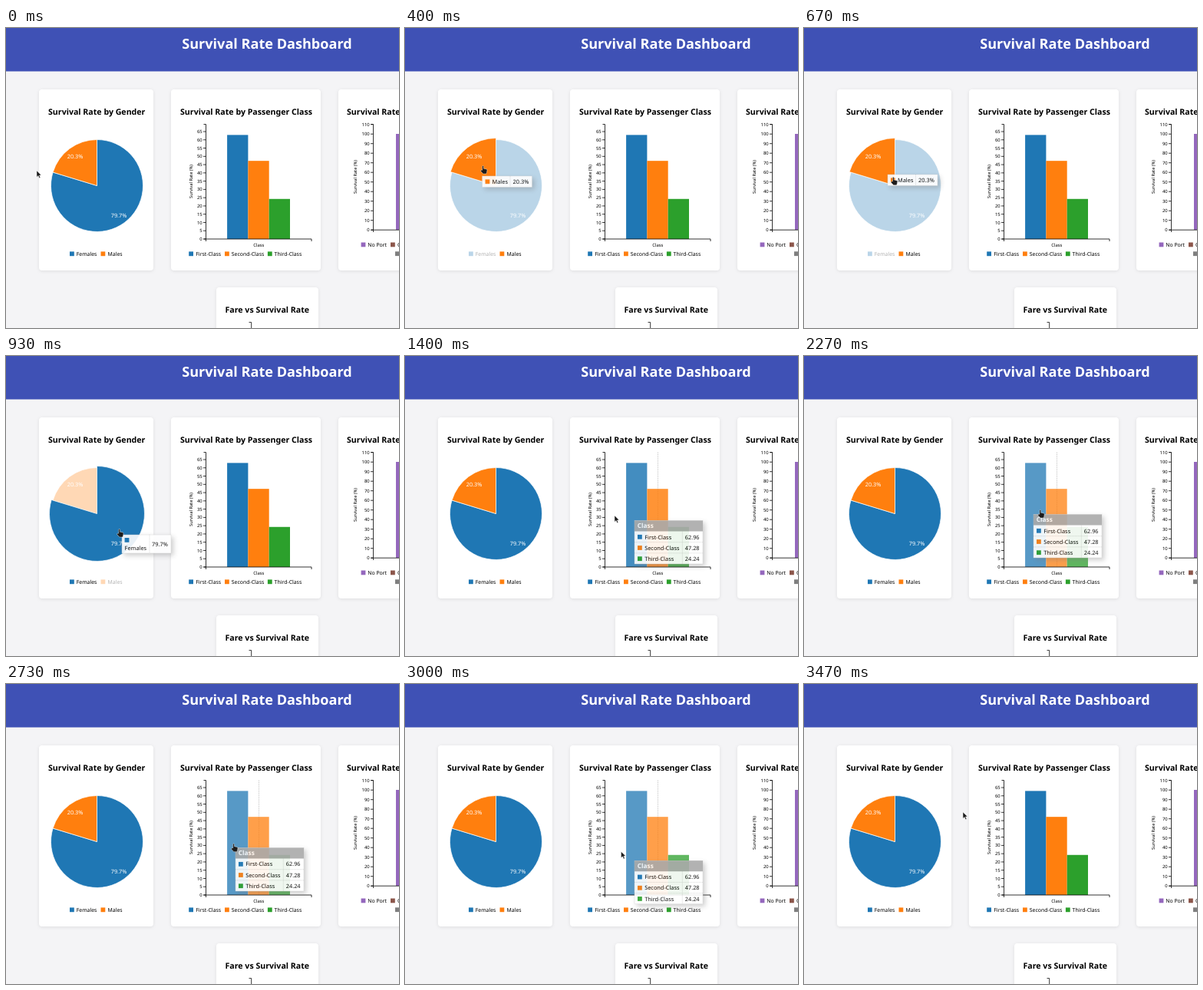
Animation, 512 px wide and 391 px high, one loop 3540 ms. Source, as an HTML page:

```html
<!DOCTYPE html>
<html lang="en">
<head>
<meta charset="utf-8">
<title>Survival Rate Dashboard</title>
<style>
  html, body { margin: 0; width: 100%; height: 100%; overflow: hidden; background: #f4f4f6; }
  svg { display: block; width: 512px; height: 391px; font-family: "Noto Sans", "Open Sans", sans-serif; text-rendering: geometricPrecision; }
  .card { filter: drop-shadow(0 1px 2px rgba(0, 0, 0, .09)); }
  .tip { filter: drop-shadow(3px 3px 3px rgba(119, 119, 119, .4)); }
</style>
</head>
<body>
<svg id="stage" viewBox="0 0 512 391"></svg>
<script>
const LOOP = 3540, STEP = 200 / 3;
const BLUE = '#1f77b4', ORANGE = '#ff7f0e', GREEN = '#2ca02c';
const PURPLE = '#9467bd', BROWN = '#8c564b', GRAY = '#7f7f7f';
const INK = '#000';
const stage = document.getElementById('stage');

function add(parent, tag, attrs = {}) {
  const el = document.createElementNS('http://www.w3.org/2000/svg', tag);
  for (const key in attrs) el.setAttribute(key, attrs[key]);
  parent.appendChild(el);
  return el;
}
const group = (parent, attrs) => add(parent, 'g', attrs);
const rect = (parent, x, y, width, height, fill, more) =>
  add(parent, 'rect', { x, y, width, height, fill, ...more });
const line = (parent, d, stroke = INK, width = 0.8, more) =>
  add(parent, 'path', { d, stroke, 'stroke-width': width, fill: 'none', ...more });
function text(parent, x, y, size, str, more) {
  const el = add(parent, 'text', { x, y, 'font-size': size, fill: INK, ...more });
  el.textContent = str;
  return el;
}
const bold = { 'font-weight': 700 };
const middle = { 'text-anchor': 'middle' };
const show = (el, on) => el.setAttribute('visibility', on ? 'visible' : 'hidden');
const move = (el, x, y) => el.setAttribute('transform', `translate(${x} ${y})`);

function card(x, y, w, h, title, titleX) {
  rect(stage, x, y, w, h, '#fff', { rx: 4, class: 'card' });
  text(stage, titleX, y + 33.2, 10.62, title, bold);
}

function legend(x, y, color, label, textX) {
  const g = group(stage);
  rect(g, x, y, 5.8, 5.8, color);
  text(g, textX, y + 5.4, 6.9, label);
  return g;
}

function yAxis(x, top, bottom, count, step, gap) {
  line(stage, `M${x - 3} ${top}H${x}V${bottom}H${x - 3}`);
  for (let i = 0; i <= count; i++) {
    const y = bottom - i * gap;
    line(stage, `M${x - 3.5} ${y}H${x}`);
    text(stage, x - 4.8, y + 2.1, 5.9, i * step, { 'text-anchor': 'end' });
  }
}

function axisLabel(x, y) {
  text(stage, 0, 0, 5.7, 'Survival Rate (%)', { ...middle, transform: `translate(${x} ${y}) rotate(-90)` });
}

// Header and cards
rect(stage, 0, 0, 512, 391, '#f4f4f6');
rect(stage, 0, 0, 512, 56.5, '#3f51b5');
text(stage, 340, 27, 18.1, 'Survival Rate Dashboard', { ...bold, ...middle, fill: '#fff' });
card(43, 80, 149, 236, 'Survival Rate by Gender', 55);
card(215, 80, 195, 236, 'Survival Rate by Passenger Class', 227);
card(433, 80, 170, 236, 'Survival Rate by Port', 444);
card(274, 338, 133, 200, 'Fare vs Survival Rate', 285.5);

// Pie
const PIE = { x: 118.5, y: 205.5, r: 60 };
const SHARE = 0.797;

function wedge(from, to, r) {
  const at = f => `${PIE.x + r * Math.sin(f * 2 * Math.PI)} ${PIE.y - r * Math.cos(f * 2 * Math.PI)}`;
  return `M${PIE.x} ${PIE.y}L${at(from)}A${r} ${r} 0 ${to - from > 0.5 ? 1 : 0} 1 ${at(to)}Z`;
}

const slices = [
  { name: 'Females', from: 0, to: SHARE, fill: BLUE, label: '79.7%', lx: 147, ly: 247, qx: 83, tx: 91.7 },
  { name: 'Males', from: SHARE, to: 1, fill: ORANGE, label: '20.3%', lx: 90, ly: 169.6, qx: 123.5, tx: 132.5 }
];
for (const s of slices) {
  s.shape = add(stage, 'path', { fill: s.fill, stroke: '#fff', 'stroke-width': 0.7 });
  text(stage, s.lx, s.ly, 7.3, s.label, { ...middle, fill: '#fff' });
  s.key = legend(s.qx, 291.4, s.fill, s.name, s.tx);
}

// Class bars
const focus = line(stage, 'M329.5 125.5V275', '#aaa', 0.7, { 'stroke-dasharray': '1.2 1.2' });
const classes = [
  ['First-Class', 62.96, BLUE, 238.2, 247.3],
  ['Second-Class', 47.28, ORANGE, 285, 293.8],
  ['Third-Class', 24.24, GREEN, 340.9, 349.6]
];
const bars = group(stage);
classes.forEach(([name, value, color, qx, tx], i) => {
  const h = value * 140 / 65;
  rect(bars, 288.1 + i * 27.3, 275 - h, 27.3, h, color);
  legend(qx, 291.4, color, name, tx);
});
yAxis(260.5, 125.5, 275, 13, 5, 140 / 13);
line(stage, 'M260.5 278V275H398V278');
text(stage, 329.3, 284.5, 5.9, 'Class', middle);
axisLabel(243, 200);

// Port bars and fare axis, cut by the stage edge
rect(stage, 508, 138, 20, 125, PURPLE);
yAxis(478.5, 125.5, 263.2, 11, 10, 12.5);
line(stage, 'M478.5 266V263.2H520');
axisLabel(457, 194);
legend(462.6, 279.5, PURPLE, 'No Port', 471.2);
legend(501, 279.5, BROWN, 'C', 510);
rect(stage, 507, 291.3, 5.8, 5.8, GRAY);
line(stage, 'M316.5 383.6H319.7V391');

// Tooltips
function tooltip(w, h) {
  const g = group(stage, { opacity: 0.9, class: 'tip' });
  rect(g, 0, 0, w, h, '#fff', { stroke: '#ccc', 'stroke-width': 0.4 });
  return g;
}
const rule = (g, d) => line(g, d, '#bbb', 0.6, { 'stroke-dasharray': '1 1' });

const femaleTip = tooltip(64, 24);
rect(femaleTip, 3.6, 4, 5.8, 5.8, BLUE);
text(femaleTip, 3.6, 20.4, 7.35, 'Females');
text(femaleTip, 39, 15, 7.4, '79.7%');
rule(femaleTip, 'M36 0V24');

const maleTip = tooltip(65, 14.5);
rect(maleTip, 4, 4.4, 5.8, 5.8, ORANGE);
text(maleTip, 13, 10, 7.4, 'Males');
text(maleTip, 40, 10, 7.4, '20.3%');
rule(maleTip, 'M36.5 0V14.5');

const classTip = tooltip(89, 56.5);
rect(classTip, 0, 0, 89, 14, '#aaa');
text(classTip, 3.8, 9.8, 8.3, 'Class', { ...bold, fill: '#fff' });
classes.forEach(([name, value, color], i) => {
  const y = 14 + i * 14.2;
  rect(classTip, 4, y + 4.4, 5.8, 5.8, color);
  text(classTip, 13.2, y + 10, 7.35, name);
  text(classTip, 84.5, y + 10, 7.3, value, { 'text-anchor': 'end' });
  if (i) rule(classTip, `M0 ${y}H89`);
});
rule(classTip, 'M62.3 14V56.5');

// Pointers
const pointer = { fill: '#1c1c1c', stroke: '#fff', 'stroke-width': 0.4 };
const arrow = add(stage, 'path', { ...pointer, d: 'M0 0V8.2L2 6.4 3.4 9.5 4.8 8.9 3.4 6 5.8 5.7Z' });
const hand = add(stage, 'path', { ...pointer,
  d: 'M.7 5.2V.4a.9 .9 0 0 1 1.8 0V3.2l3.5 .7q1.1 .3 1 1.5l-.5 3-.7 1.7H1.8L-1.4 6.6q-.4-1.3 .9-1.4Z' });

// Pointer route: time, x, y
const route = [
  [0, 40, 186], [133, 52, 188], [333, 95.5, 186], [400, 100, 180], [600, 104, 184],
  [860, 146, 226], [933, 146, 226], [1070, 168, 222], [1270, 245, 208], [1333, 262, 208],
  [1400, 273, 208], [1733, 304, 203], [1800, 306, 203], [2200, 308, 200], [2667, 295.5, 207],
  [2733, 295, 208.5], [2930, 292, 224], [3130, 262, 208], [3200, 248, 195], [3467, 207, 167], [LOOP, 207, 167]
];

function place(t) {
  t = Math.max(0, t);
  const i = Math.max(1, route.findIndex(p => p[0] >= t));
  const [t0, x0, y0] = route[i - 1], [t1, x1, y1] = route[i];
  const f = (t - t0) / (t1 - t0);
  return { x: x0 + (x1 - x0) * f, y: y0 + (y1 - y0) * f };
}

function hover(t) {
  const { x, y } = place(t), dx = x - PIE.x, dy = y - PIE.y;
  if (Math.hypot(dx, dy) < PIE.r) {
    const turn = (Math.atan2(dx, -dy) / (2 * Math.PI) + 1) % 1;
    return turn > SHARE ? 'Males' : 'Females';
  }
  return x >= 260.5 && x < 398 && y > 125 && y < 275 ? 'Class' : '';
}

// Share of the last 150 ms spent over a part
const weight = (name, t) => [0, 50, 100].filter(d => hover(t - d) === name).length / 3;

function draw(time) {
  const t = Math.floor((time % LOOP + 4) / STEP) * STEP;
  const over = hover(t), pos = place(t);
  slices.forEach((s, i) => {
    const opacity = 1 - 0.7 * weight(slices[1 - i].name, t);
    s.shape.setAttribute('d', wedge(s.from, s.to, PIE.r + 2 * weight(s.name, t)));
    s.shape.setAttribute('opacity', opacity);
    s.key.setAttribute('opacity', opacity);
  });
  bars.setAttribute('opacity', 1 - 0.25 * weight('Class', t));
  show(focus, over === 'Class');

  const late = place(t - STEP);
  show(femaleTip, over === 'Females');
  show(maleTip, over === 'Males');
  show(classTip, over === 'Class');
  move(femaleTip, late.x + 5, late.y + 7);
  move(maleTip, late.x + 5, late.y + 7);
  move(classTip, 299, late.y + 6.5);

  const pointing = over === 'Males' || over === 'Females' || (over === 'Class' && pos.x >= 288.1);
  show(hand, pointing);
  show(arrow, !pointing);
  move(hand, pos.x, pos.y);
  move(arrow, pos.x, pos.y);
}

const start = performance.now();
function tick() {
  draw(performance.now() - start);
  requestAnimationFrame(tick);
}
tick();
</script>
</body>
</html>
```
